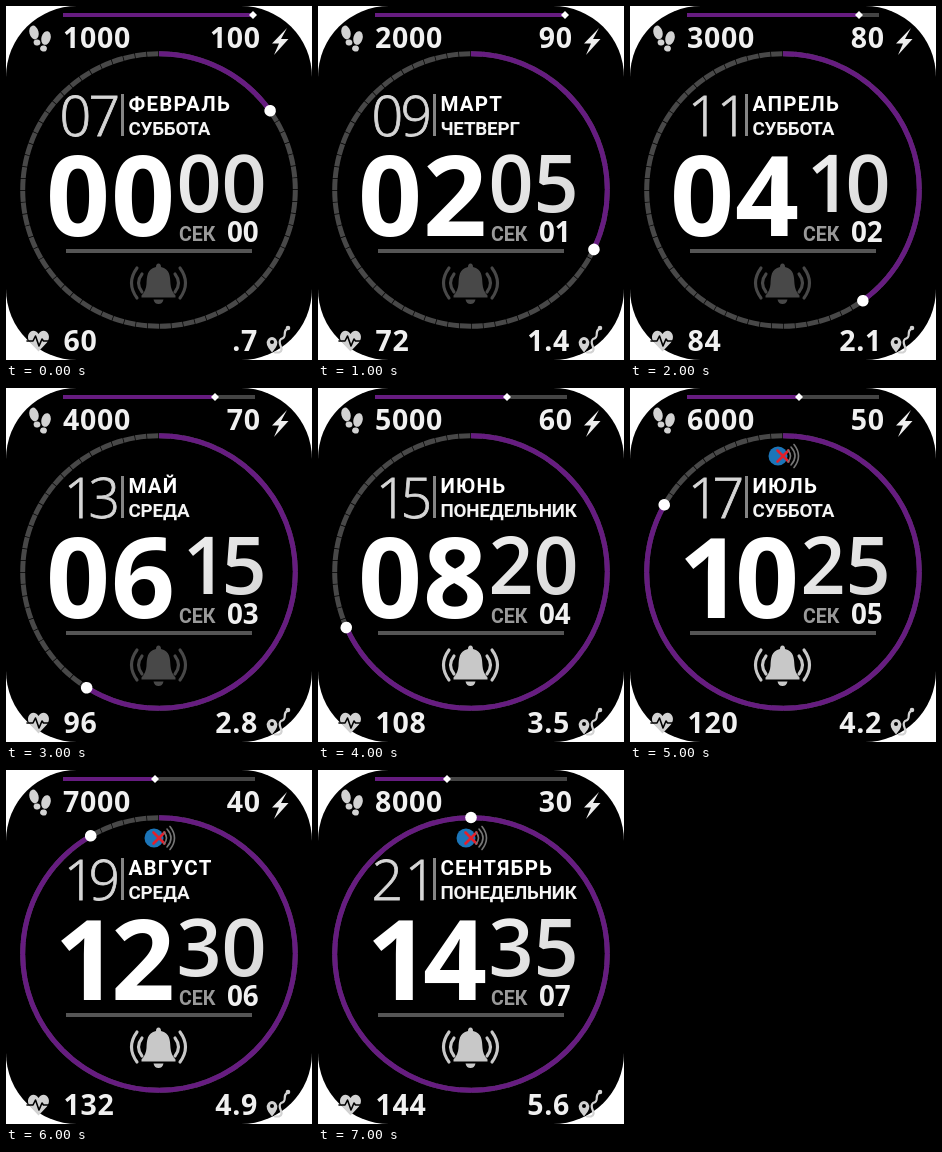
Animation of 306 by 354 pixels, one loop 8000 ms. Source, as an HTML page:

```html
<!DOCTYPE html>
<html lang="ru">
<head>
<meta charset="utf-8">
<title>Циферблат</title>
<style>
html, body { margin: 0; width: 100%; height: 100%; overflow: hidden; background: #fff; }
svg { display: block; width: 306px; height: 354px; }
text { font-family: "Open Sans", "Noto Sans", sans-serif; font-weight: 700; fill: #f0f0f0; }
.stat { font-size: 28.5px; letter-spacing: .7px; }
.right { text-anchor: end; }
#hour { font-size: 112px; letter-spacing: 1px; fill: #fff; }
#min { font-size: 79px; font-weight: 600; fill: url(#silver); }
#sec { font-size: 27.8px; }
#day { font-size: 55.5px; font-weight: 300; letter-spacing: -2.6px; fill: #d6d6d6; stroke: #d6d6d6; stroke-width: .8; }
.word { font-family: Roboto, sans-serif; }
#month { font-size: 20.5px; letter-spacing: 1.2px; fill: #fff; }
#week { font-size: 18.8px; letter-spacing: -.2px; fill: #f4f4f4; }
#secLabel { font-size: 19.6px; fill: #999; }
.line { fill: none; stroke-linecap: round; stroke-linejoin: round; }
.ring { fill: none; stroke-width: 5; }
#bell { color: #484848; }
#bell.on { color: #c8c8c8; }
</style>
</head>
<body>
<svg viewBox="0 0 306 354">
  <defs>
    <linearGradient id="silver" x1="0" y1="0" x2="1" y2="1">
      <stop offset="0" stop-color="#f4f4f4"/>
      <stop offset="1" stop-color="#d4d4d4"/>
    </linearGradient>
    <g id="waves" class="line" stroke="currentColor">
      <path d="M0-9Q7 0 0 9M5-15Q16 0 5 15"/>
    </g>
  </defs>
  <rect width="306" height="354" rx="71"/>

  <!-- battery bar -->
  <rect x="57" y="7" width="192" height="4" fill="#444"/>
  <rect id="bar" x="57" y="7" height="4" fill="#661c80"/>
  <path id="barDot" d="M0 5L4 9L0 13L-4 9Z" fill="#fff"/>

  <!-- progress ring -->
  <g transform="translate(153 184)">
    <g transform="rotate(-90)">
      <circle class="ring" r="136.3" pathLength="360" stroke="#484848" stroke-dasharray="4.7 .3"/>
      <circle class="ring" id="arc" r="136.3" pathLength="360" stroke="#661c80"/>
    </g>
    <circle id="ringDot" cy="-136.5" r="5.8" fill="#fff"/>
  </g>

  <!-- footprints -->
  <g fill="#d2d2d2">
    <ellipse cx="28" cy="26.500" rx="4.6" ry="7" transform="rotate(-14 28 26.500)"/>
    <ellipse cx="31" cy="36.500" rx="3.4" ry="3" transform="rotate(-14 31 36.500)"/>
    <ellipse cx="40" cy="32" rx="4.6" ry="7" transform="rotate(16 40 32)"/>
    <ellipse cx="37.500" cy="42.500" rx="3.4" ry="3" transform="rotate(16 37.500 42.500)"/>
  </g>
  <path d="M281 22L266 37.500L273 37.500L268 49L282.500 33L275 33Z" fill="#eee"/>

  <!-- heart -->
  <path d="M32.5 345.5L24 336.500C18 329 27 320 32.5 328C38 320 47 329 41 336.500Z" fill="#d2d2d2"/>
  <path class="line" d="M21 335H27L29.500 330L33 340L36 333L37.500 335H44" stroke="#000" stroke-width="1.6"/>

  <!-- route -->
  <path d="M266 346.500Q258 338 262 333Q266 329 270 333Q274 338 266 346.500Z" fill="#d2d2d2"/>
  <circle cx="266" cy="336" r="2" fill="#000"/>
  <g class="line" stroke="#d2d2d2" stroke-width="2.2">
    <path d="M269 346.500H273C280 344 270 337 275 333C282 331 276 326 281 323"/>
    <circle cx="282" cy="322" r="1.2"/>
  </g>

  <text class="stat" id="steps" x="57" y="41.500"/>
  <text class="stat right" id="power" x="254.800" y="41.500"/>
  <text class="stat" id="pulse" x="57.500" y="345"/>
  <text class="stat right" id="dist" x="252" y="345"/>

  <!-- lost connection -->
  <g id="link">
    <circle cx="148" cy="68" r="9.500" fill="#1c75b8"/>
    <path class="line" d="M147.500 62.500L158.500 73.500M158.500 62.500L147.500 73.500" stroke="#e3202b" stroke-width="2.6"/>
    <path class="line" d="M158 62Q163 68 158 74M161 59Q169 68 161 77M164 56.500Q173 68 164 79.500" stroke="#777" stroke-width="1.6"/>
  </g>

  <text id="day" x="53.500" y="129.500"/>
  <rect x="115" y="88" width="3" height="42" fill="#858585"/>
  <text class="word" id="month" x="122.500" y="104.500"/>
  <text class="word" id="week" x="122.500" y="129"/>

  <text id="hour" x="40" y="229.500"/>
  <text id="min" x="170.500" y="205.500"/>
  <text class="word" id="secLabel" x="173" y="235">СЕК</text>
  <text id="sec" x="221" y="236"/>
  <rect x="60" y="243" width="186" height="4" fill="#555"/>

  <g id="bell">
    <path fill="currentColor" d="M150 261Q150 257.500 152.500 257.500T155 261C164 263 164 270 164.500 278Q165 285 169.500 289.500V291.500H135.500V289.500Q140 285 140.500 278C141 270 141 263 150 261ZM147.500 293.500H157.500Q156.500 298 152.500 298T147.500 293.500Z"/>
    <use href="#waves" x="169" y="277" stroke-width="3.1"/>
    <use href="#waves" transform="translate(136 277) scale(-1 1)" stroke-width="3.1"/>
  </g>
</svg>
<script>
const $ = id => document.getElementById(id);
const months = ["ФЕВРАЛЬ", "МАРТ", "АПРЕЛЬ", "МАЙ", "ИЮНЬ", "ИЮЛЬ", "АВГУСТ", "СЕНТЯБРЬ"];
const weekdays = ["СУББОТА", "ЧЕТВЕРГ", "СУББОТА", "СРЕДА", "ПОНЕДЕЛЬНИК", "СУББОТА", "СРЕДА", "ПОНЕДЕЛЬНИК"];
const days = [7, 9, 11, 13, 15, 17, 19, 21];
const angles = [54.5, 115.8, 144.2, 212, 246, 299.5, 330, 360];
const pad = n => String(n).padStart(2, "0");

// Ones sit towards the right of their cell
function nudgeOnes(id) {
  const shift = c => c === "1" ? 0.075 : 0;
  const s = $(id).textContent;
  const dx = [...s].map((c, i) => shift(c) - (i ? shift(s[i - 1]) : 0) + "em");
  $(id).setAttribute("dx", dx.join(" "));
}

function show(i) {
  const power = 100 - i * 10;
  const labels = {
    steps: (i + 1) * 1000,
    power,
    pulse: 60 + i * 12,
    dist: ((i + 1) * 0.7).toFixed(1).replace(/^0/, ""),
    day: pad(days[i]),
    month: months[i],
    week: weekdays[i],
    hour: pad(i * 2),
    min: pad(i * 5),
    sec: pad(i)
  };
  for (const id in labels) $(id).textContent = labels[id];
  ["day", "hour", "min"].forEach(nudgeOnes);

  const x = Math.min(247, 69 + power * 2);
  $("bar").setAttribute("width", x - 57);
  $("barDot").setAttribute("transform", `translate(${x})`);
  $("arc").setAttribute("stroke-dasharray", angles[i] + " 360");
  $("ringDot").setAttribute("transform", `rotate(${angles[i]})`);
  $("bell").classList.toggle("on", i >= 4);
  $("link").style.display = i >= 5 ? "" : "none";
}

let last = -1;
function tick() {
  const i = Math.floor(performance.now() / 1000) % 8;
  if (i !== last) show(last = i);
  requestAnimationFrame(tick);
}
tick();
</script>
</body>
</html>
```
